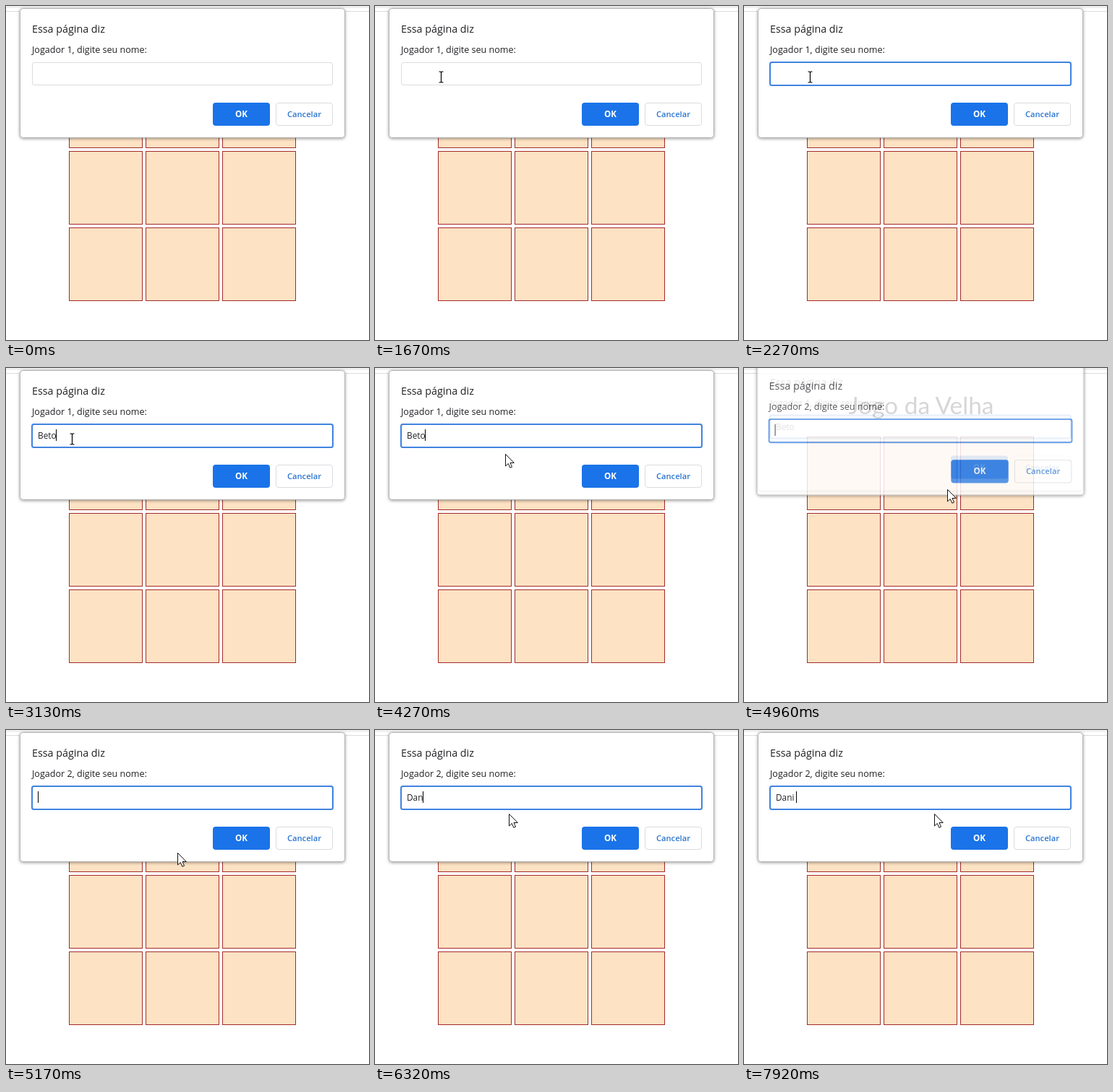
Recreate the animation shown at these times as an HTML page. Size 502 by 463 pixels, loop 7990 ms.

```html
<!DOCTYPE html>
<html lang="pt-BR">
<head>
<meta charset="utf-8">
<title>Jogo da Velha</title>
<style>
  html, body { margin: 0; width: 100%; height: 100%; overflow: hidden; background: #fff; }
  svg { display: block; width: 502px; height: 463px; }
  text { font-family: "Open Sans", "Noto Sans", sans-serif; fill: #202124; white-space: pre; }
  .heading { font: 33.5px "Comic Sans MS", Lato, cursive, sans-serif; fill: #000; }
  .cell { fill: #fde2c3; stroke: #a52a2a; }
  .panel { fill: #fff; stroke: #b4b4b4; filter: drop-shadow(0 1px 2px rgba(0, 0, 0, .4)); }
  .title { font-size: 14.3px; }
  .label { font-size: 12.55px; }
  .value { font-size: 11.8px; }
  .box { fill: #fff; stroke: #dadce0; }
  .ring { fill: none; stroke: #3f83e0; stroke-width: 2; }
  .ok { fill: #1a73e8; }
  .ok.hover { fill: #327ce3; }
  .action { font-size: 11.2px; font-weight: 600; fill: #2a75cf; text-anchor: middle; }
  .action.main { font-size: 11.6px; font-weight: 700; fill: #fff; }
</style>
</head>
<body>
<svg viewBox="0 0 502 463">
  <rect width="502" height="3" fill="#f1f1f1"/>
  <rect y="7" width="502" height="1" fill="#dcdcdc"/>
  <text class="heading" x="245" y="64" text-anchor="middle">Jogo da Velha</text>
  <g id="board"></g>
  <g id="second"></g>
  <g id="first"></g>
  <g id="pointer">
    <path id="arrow" d="M0 0V16.5L3.8 13L6.3 18.8L9 17.7L6.5 12H11.8Z" fill="#fff" stroke="#111" stroke-linejoin="round"/>
    <path id="beam" d="M-3 -7.5H-1L0 -6.5L1 -7.5H3M0 -6.5V6.5M-3 7.5H-1L0 6.5L1 7.5H3" fill="none" stroke="#000" stroke-width="1.2"/>
    <circle id="press" cx="1" cy="0" r="12" fill="#f5eb14" fill-opacity=".55"/>
  </g>
</svg>
<script>
const LOOP = 7990, STEP = 70;
const byId = id => document.getElementById(id);

// start, end, from x, from y, to x, to y
const moves = [
  [1050, 1400, 14, 67, 91, 108],
  [1600, 1670, 91, 103, 91, 98],
  [3990, 4690, 93, 99, 310, 150],
  [4820, 4960, 310, 150, 281, 168],
  [5030, 5100, 266, 177, 250, 183],
  [5170, 5440, 237, 170, 185, 116],
  [7710, 7920, 205, 116, 263, 116]
];
const presses = [[1740, 1810], [4820, 4890]];
const carets = [[1740, 2270], [2600, 3590], [4120, 4650], [4890, 5390],
                [5920, 6850], [6920, 7510], [7710, LOOP]];
const typedFirst = [[0, ""], [2600, "B"], [2800, "Be"], [2930, "Bet"], [3130, "Beto"]];
const typedSecond = [[0, ""], [6120, "D"], [6250, "Da"], [6320, "Dan"], [6920, "Dani"], [7710, "Dani "]];

// time, opacity, vertical shift, scale
const poseFirst = [[0, 1, 0, 1], [4890, .6, -5, 1], [4960, .12, -12.5, 1], [5030, 0, -14, 1]];
const poseSecond = [[0, 0, -14, 1], [4890, .3, -12, 1.01], [4960, .82, -7, 1.007],
                    [5030, .97, -2, 1.002], [5100, 1, 0, 1]];

const latest = (rows, t) => rows.filter(r => r[0] <= t).pop();
const within = (spans, t) => spans.some(([a, b]) => t >= a && t < b);
const show = (el, on) => el.setAttribute("visibility", on ? "inherit" : "hidden");

function makeDialog(id, player) {
  const root = byId(id);
  root.innerHTML = `
    <rect class="panel" x="19.5" y="3.5" width="449" height="179" rx="4"/>
    <text class="title" x="36" y="37">Essa página diz</text>
    <text class="label" x="36" y="65">Jogador ${player}, digite seu nome:</text>
    <rect class="box" x="36.5" y="78.5" width="415" height="31" rx="2.5"/>
    <rect class="ring" x="36" y="78" width="416" height="32" rx="2.5"/>
    <text class="value" x="44" y="98"></text>
    <rect class="caret" y="85" width="1" height="16"/>
    <rect class="ok" x="286" y="134" width="79" height="32" rx="4"/>
    <text class="action main" x="325.5" y="154">OK</text>
    <rect class="box" x="373.5" y="134.5" width="78" height="31" rx="3.5"/>
    <text class="action" x="412.5" y="154">Cancelar</text>`;
  const part = name => root.querySelector("." + name);
  return { root, ring: part("ring"), value: part("value"), caret: part("caret"), ok: part("ok") };
}

function drawDialog(d, t, poses, typed, focused, caretOn, hover) {
  const [, alpha, dy, scale] = latest(poses, t);
  d.root.setAttribute("opacity", alpha);
  d.root.setAttribute("transform", `translate(244 ${93 + dy}) scale(${scale}) translate(-244 -93)`);
  show(d.root, alpha > 0);
  show(d.ring, focused);
  d.value.textContent = latest(typed, t)[1];
  d.caret.setAttribute("x", 44 + Math.floor(d.value.getComputedTextLength()));
  show(d.caret, caretOn);
  d.ok.classList.toggle("hover", hover);
}

function pointerAt(t) {
  const m = latest(moves, t);
  if (!m) return null;
  const [start, end, x0, y0, x1, y1] = m;
  const p = t >= end ? 1 : Math.floor((t - start) / STEP) * STEP / (end - start);
  return [x0 + (x1 - x0) * p, y0 + (y1 - y0) * p];
}

function draw(t) {
  const pos = pointerAt(t);
  const [x, y] = pos || [0, 0];
  const inField = x > 36 && x < 452 && y > 78 && y < 110;
  const onOk = x >= 286 && x < 365 && y >= 134 && y < 166;
  const caretOn = within(carets, t);

  show(byId("pointer"), !!pos);
  byId("pointer").setAttribute("transform", `translate(${Math.round(x) + .5} ${Math.round(y) + .5})`);
  show(byId("beam"), inField);
  show(byId("arrow"), !inField);
  show(byId("press"), within(presses, t));

  drawDialog(first, t, poseFirst, typedFirst, t >= 1740, caretOn && t < 4890, onOk);
  drawDialog(second, t, poseSecond, typedSecond, true, caretOn && t >= 4890, false);
}

for (let i = 0; i < 9; i++) {
  const x = 87.5 + i % 3 * 106, y = 95.5 + Math.floor(i / 3) * 106;
  byId("board").innerHTML += `<rect class="cell" x="${x}" y="${y}" width="101" height="101"/>`;
}
const first = makeDialog("first", 1);
const second = makeDialog("second", 2);

const origin = performance.now();
function tick() {
  draw((performance.now() - origin) % LOOP);
  requestAnimationFrame(tick);
}
draw(0);
requestAnimationFrame(tick);
</script>
</body>
</html>
```
